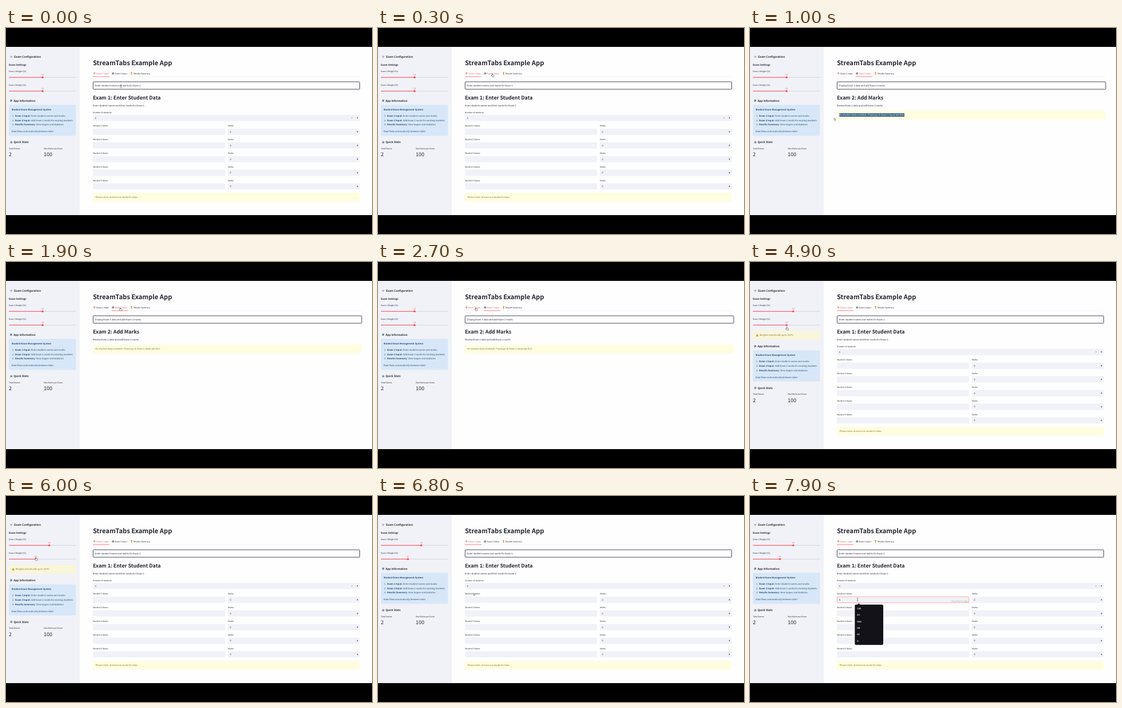
These frames come from a looping animation (640 px wide and 360 px high, 8000 ms). An HTML page:

```html
<!DOCTYPE html>
<html lang="en">
<head>
<meta charset="utf-8">
<title>Exam app</title>
<style>
html, body { margin: 0; width: 100%; height: 100%; overflow: hidden; background: #000; }
svg { display: block; width: 100vw; height: 100vh; }
text {
  font-family: "Noto Sans CJK JP", "Noto Sans CJK SC", "Noto Sans CJK KR", "Noto Sans CJK TC", "Noto Sans CJK", "Open Sans", sans-serif;
  text-rendering: geometricPrecision;
  white-space: pre;
}
</style>
</head>
<body>
<svg id="stage" viewBox="0 0 640 360"></svg>
<script>
const LOOP = 8000, STEP = 100;
const INK = '#272733', RED = '#ff4b55', FIELD = '#f1f2f8', LINE = '#dfe0e8',
      WARN = '#fffde0', SIDE_WARN = '#f8f6da', WARN_INK = '#86702e',
      INFO = '#d8e7f7', INFO_INK = '#1c4b7c';

const stage = document.getElementById('stage');

function add(parent, tag, attrs = {}) {
  const el = document.createElementNS('http://www.w3.org/2000/svg', tag);
  for (const k in attrs) el.setAttribute(k, attrs[k]);
  parent.appendChild(el);
  return el;
}
const group = (parent, attrs) => add(parent, 'g', attrs);
const box = (parent, x, y, right, bottom, fill, extra) =>
  add(parent, 'rect', { x, y, width: right - x, height: bottom - y, fill, ...extra });
const path = (parent, d, stroke, width, fill = 'none') =>
  add(parent, 'path', { d, stroke, 'stroke-width': width, fill });

// Text is placed by the middle of its capitals.
function label(parent, x, mid, str, size, fill = INK, extra = {}) {
  const el = add(parent, 'text', { x, y: mid + size * 0.365, 'font-size': size, fill, ...extra });
  el.textContent = str;
  return el;
}
const BOLD = { 'font-weight': 700 };
const show = (el, on) => el.setAttribute('visibility', on ? 'inherit' : 'hidden');

// Small icons, each about 4 px wide
function noteIcon(p, x, y, paper, pen) {
  box(p, x - 1.7, y - 1.9, x + 1.3, y + 1.9, paper);
  path(p, `M${x - 1} ${y - .7}h1.6M${x - 1} ${y + .4}h1.2`, '#80808e', .35);
  path(p, `M${x + .1} ${y + 1}L${x + 2} ${y - 1.2}`, pen, .8);
}
function chartIcon(p, x, y) {
  box(p, x - 2, y - 2, x + 2, y + 2, '#c8d0dc');
  box(p, x - 1.5, y - .3, x - .6, y + 1.7, '#3f9a52');
  box(p, x - .4, y - 1.6, x + .5, y + 1.7, '#c0553f');
  box(p, x + .7, y - .9, x + 1.6, y + 1.7, '#3a6ca0');
}
function cupIcon(p, x, y) {
  path(p, `M${x - 1.5} ${y - 2}h3q0 2.8-1.5 2.8t-1.5-2.8z`, 'none', 0, '#e0a030');
  box(p, x - .3, y + .4, x + .3, y + 1.4, '#b98420');
  box(p, x - 1.1, y + 1.2, x + 1.1, y + 2, '#7a5a28');
}

// Page
box(stage, 0, 33, 640, 327, '#fefefe');
box(stage, 0, 33, 129, 327, FIELD);

// Sidebar
const side = group(stage);
noteIcon(side, 9, 50.3, '#c4c8d8', '#a08a7c');
label(side, 14, 50.3, 'Exam Configuration', 4.85, INK, BOLD);
label(side, 5, 64.7, 'Exam Settings', 4.4, INK, BOLD);

function makeSlider(name, y) {
  label(side, 5, y - 10.2, name, 3.5);
  box(side, 5, y - .55, 122.5, y + .55, '#d2d4dc', { rx: .5 });
  const bar = box(side, 5, y - .55, 64, y + .55, RED, { rx: .5 });
  const knob = add(side, 'circle', { cy: y, r: 1.75, fill: RED });
  const num = label(side, 64, y - 4.2, '50', 3.5, RED, { 'text-anchor': 'middle' });
  return value => {
    const x = 5.5 + value * 1.17;
    bar.setAttribute('width', x - 5);
    knob.setAttribute('cx', x);
    num.setAttribute('x', x);
    num.textContent = value;
  };
}
const setFirst = makeSlider('Exam 1 Weight (%)', 86.2);
const setSecond = makeSlider('Exam 2 Weight (%)', 110.2);

const weightWarn = group(side);
box(weightWarn, 5, 120, 122.5, 136, SIDE_WARN, { rx: 2 });
path(weightWarn, 'M12.5 126l2 3.8h-4z', '#9a6a20', .3, '#f0a030');
path(weightWarn, 'M12.5 127.3v1.2M12.5 129v.4', '#40351a', .4);
label(weightWarn, 16.8, 128, 'Weights should add up to 100%', 4.03, WARN_INK);

const lower = group(side);
noteIcon(lower, 9, 127, '#6f98a0', '#4c5c4c');
label(lower, 13.2, 127, 'App Information', 4.75, INK, BOLD);
box(lower, 5, 134.3, 122.5, 188.5, INFO, { rx: 2 });
label(lower, 9.7, 142.6, 'Student Exam Management System', 4, INFO_INK, BOLD);
[['Exam 1 Input:', ' Enter student names and marks'],
 ['Exam 2 Input:', ' Add Exam 2 marks for existing students'],
 ['Results Summary:', ' View topper and statistics']].forEach(([head, rest], i) => {
  const y = 153.7 + i * 7.6;
  label(lower, 10.8, y, `${i + 1}.`, 4.03, INFO_INK);
  const line = label(lower, 16, y, '', 4.03, INFO_INK);
  add(line, 'tspan', BOLD).textContent = head;
  add(line, 'tspan').textContent = rest;
});
label(lower, 9.7, 180.8, 'Data flows automatically between tabs!', 4.03, INFO_INK);
chartIcon(lower, 9, 199.5);
label(lower, 13.2, 199.5, 'Quick Stats', 4.75, INK, BOLD);
label(lower, 5, 210.8, 'Total Exams', 3.5);
label(lower, 66, 210.8, 'Max Marks per Exam', 3.5);
label(lower, 5, 221.2, '2', 9);
label(lower, 66, 221.2, '100', 9);

// Main column head
label(stage, 152, 61.4, 'StreamTabs Example App', 11.17, INK, BOLD);
noteIcon(stage, 154.5, 79.3, '#ecc4b8', '#e07a50');
chartIcon(stage, 187, 79.3);
cupIcon(stage, 219.5, 79.3);
const tabs = [
  label(stage, 158, 79.3, 'Exam 1 Input', 3.55),
  label(stage, 190.3, 79.3, 'Exam 2 Input', 3.55),
  label(stage, 223, 79.3, 'Results Summary', 3.55)
];
const rule = box(stage, 152, 84.9, 618.5, 85.2, LINE);
const underline = box(stage, 152, 84.6, 181, 85.3, RED);

function makeTab(right, hint, title, intro) {
  const g = group(stage);
  box(g, 152.3, 94, right, 107, '#fff', { rx: 1.2, stroke: '#34344a', 'stroke-width': .9 });
  label(g, 155.8, 100.4, hint, 4);
  label(g, 152, 121.5, title, 8.85, INK, BOLD);
  label(g, 152, 135.4, intro, 4.03);
  return g;
}

// First tab
const form = makeTab(618.5, 'Enter student names and marks for Exam 1.',
  'Exam 1: Enter Student Data', 'Enter student names and their marks for Exam 1.');
const minus = y => path(form, `M604 ${y}h2.2`, INK, .5);
const plus = y => path(form, `M613.3 ${y}h2.4M614.5 ${y - 1.2}v2.4`, INK, .6);
label(form, 152, 147.3, 'Number of students:', 3.5);
box(form, 152, 151.8, 618.5, 162.4, FIELD, { rx: 1.5 });
label(form, 155.6, 157.1, '5', 4);
minus(157.1);
plus(157.1);
for (let i = 0; i < 5; i++) {
  const y = 181.3 + i * 23.9;
  label(form, 152, y - 10.2, `Student ${i + 1} Name:`, 3.5);
  box(form, 152, y - 5.4, 383, y + 5.4, FIELD, { rx: 1.5 });
  label(form, 388, y - 10.2, 'Marks:', 3.5);
  box(form, 388, y - 5.4, 618.5, y + 5.4, FIELD, { rx: 1.5 });
  label(form, 391.6, y, '0', 4);
  plus(y);
}
box(form, 152, 287.8, 618.5, 303.4, WARN, { rx: 2 });
label(form, 156.5, 295.2, "Please enter at least one student's data.", 4.03, WARN_INK);

const focus = group(form);
box(focus, 152.3, 176.1, 382.8, 186.5, 'none', { rx: 1.5, stroke: '#ff7a78', 'stroke-width': .6 });
const typed = group(form);
label(typed, 155.6, 181.5, 'A', 4);
label(typed, 381, 183.6, 'Press Enter to apply', 3.1, '#92929c', { 'text-anchor': 'end' });

const menu = group(form);
path(menu, 'M187.5 190.5l2.8-3 2.8 3z', 'none', 0, '#121218');
box(menu, 183.3, 189.8, 233, 260.3, '#121218', { rx: 2.5 });
['CDE', 'XII', 'HAH', 'NR', 'DC', 'R'].forEach((s, i) =>
  label(menu, 187.2, 196.7 + i * 11.35, s, 3.6, '#f0f0f4', BOLD));

// Second tab
const review = makeTab(622, 'Display Exam 1 data and add Exam 2 marks.',
  'Exam 2: Add Marks', 'Review Exam 1 data and add Exam 2 marks.');
box(review, 152, 144.2, 622, 159.8, WARN, { rx: 2 });
const emptyNote = 'No student data available. Please go to Exam 1 Input tab first.';
const plain = label(review, 156.3, 152, emptyNote, 4.03, WARN_INK);
const noteEnd = 156.3 + plain.getComputedTextLength();
const clip = add(add(stage, 'clipPath', { id: 'picked' }), 'rect', { y: 148.7, height: 6.6 });
const picked = group(review, { 'clip-path': 'url(#picked)' });
box(picked, 150, 148.7, 300, 155.3, '#3d688c');
label(picked, 156.3, 152, emptyNote, 4.03, '#f2f2ee');

// Pointer, one drawing per kind
const pointer = group(stage);
const kinds = { arrow: group(pointer), hand: group(pointer), beam: group(pointer) };
path(kinds.arrow, 'M0 0v4.2l1-.9.7 1.5.7-.3-.7-1.5h1.3z', '#202024', .4, '#fff');
path(kinds.hand, 'M-.5 0q.6-.7 1.1 0v1.8l2 .5q.6.3.4 1l-.5 1.8h-2.7l-1.9-2.2q.3-.8 1.6 0z', '#202024', .5, '#fff');
path(kinds.beam, 'M-.9-2.3h1.8M0-2.3v4.6M-.9 2.3h1.8', '#202024', .5);

const moves = [
  [0, 201, 102, 'beam'], [100, 201, 98, 'arrow'], [300, 200, 80, 'hand'], [500, 200, 80, 'arrow'],
  [700, 272, 153, 'beam'], [1000, 147, 157, 'arrow'], [1300, 147, 157, 'arrow'],
  [1800, 200, 80, 'hand'], [2300, 200, 80, 'hand'], [2700, 171, 80, 'hand'],
  [2900, 171, 80, 'arrow'], [3500, 64, 85, 'hand'], [3600, 64, 85, 'hand'],
  [4000, 75.7, 85, 'hand'], [4200, 75.7, 85, 'hand'], [4400, 77, 89, 'hand'],
  [4600, 77, 89, 'hand'], [4900, 64.5, 114, 'hand'], [5100, 64, 108.5, 'hand'],
  [5400, 57.5, 108.5, 'hand'], [5700, 51, 108.5, 'hand'], [5900, 51, 108, 'hand'],
  [6000, 52.2, 107.8, 'hand'], [6200, 52.2, 107.8, 'arrow'], [7000, 188, 181, 'beam'],
  [LOOP, 188, 181, 'beam']
];
function pointerAt(t) {
  const i = moves.findIndex((m, n) => t >= m[0] && t < moves[n + 1][0]);
  const [t0, x0, y0, kind] = moves[i], [t1, x1, y1] = moves[i + 1];
  const k = (t - t0) / (t1 - t0), e = k * k * (3 - 2 * k);
  return { x: x0 + (x1 - x0) * e, y: y0 + (y1 - y0) * e, kind };
}

// Value of the last step reached: [time, value, time, value, ...]
function stepAt(t, list) {
  let v = list[1];
  for (let i = 0; i < list.length; i += 2) if (t >= list[i]) v = list[i + 1];
  return v;
}
const within = (t, a, b) => t >= a && t < b;

function render(t) {
  const p = pointerAt(t);
  const second = within(t, 400, 2900);
  show(form, !second);
  show(review, second);
  underline.setAttribute('x', second ? 184.7 : 152);
  rule.setAttribute('width', second ? 470 : 466.5);

  const hover = p.kind === 'hand' && within(p.y, 75, 84) && p.x > 150 ? (p.x < 183 ? 0 : 1) : -1;
  tabs.forEach((el, i) =>
    el.setAttribute('fill', i === +second || i === hover ? RED : INK));

  const selecting = within(t, 700, 1300);
  show(picked, second && selecting);
  const left = Math.max(156.3, p.x);
  clip.setAttribute('x', left);
  clip.setAttribute('width', Math.max(0, noteEnd - left));

  setFirst(stepAt(t, [0, 50, 3800, 55, 3900, 60]));
  setSecond(stepAt(t, [0, 50, 5300, 45, 5600, 40]));
  const warned = within(t, 4600, 6300);
  show(weightWarn, warned);
  lower.setAttribute('transform', `translate(0 ${warned ? 20.3 : 0})`);

  show(focus, t >= 7100);
  show(menu, t >= 7200);
  show(typed, t >= 7600);

  pointer.setAttribute('transform', `translate(${p.x} ${p.y})`);
  for (const k in kinds) show(kinds[k], k === p.kind);
}

const start = performance.now();
function tick() {
  const t = (performance.now() - start) % LOOP;
  render(Math.floor(t / STEP) * STEP);
  requestAnimationFrame(tick);
}
render(0);
requestAnimationFrame(tick);
</script>
</body>
</html>
```
